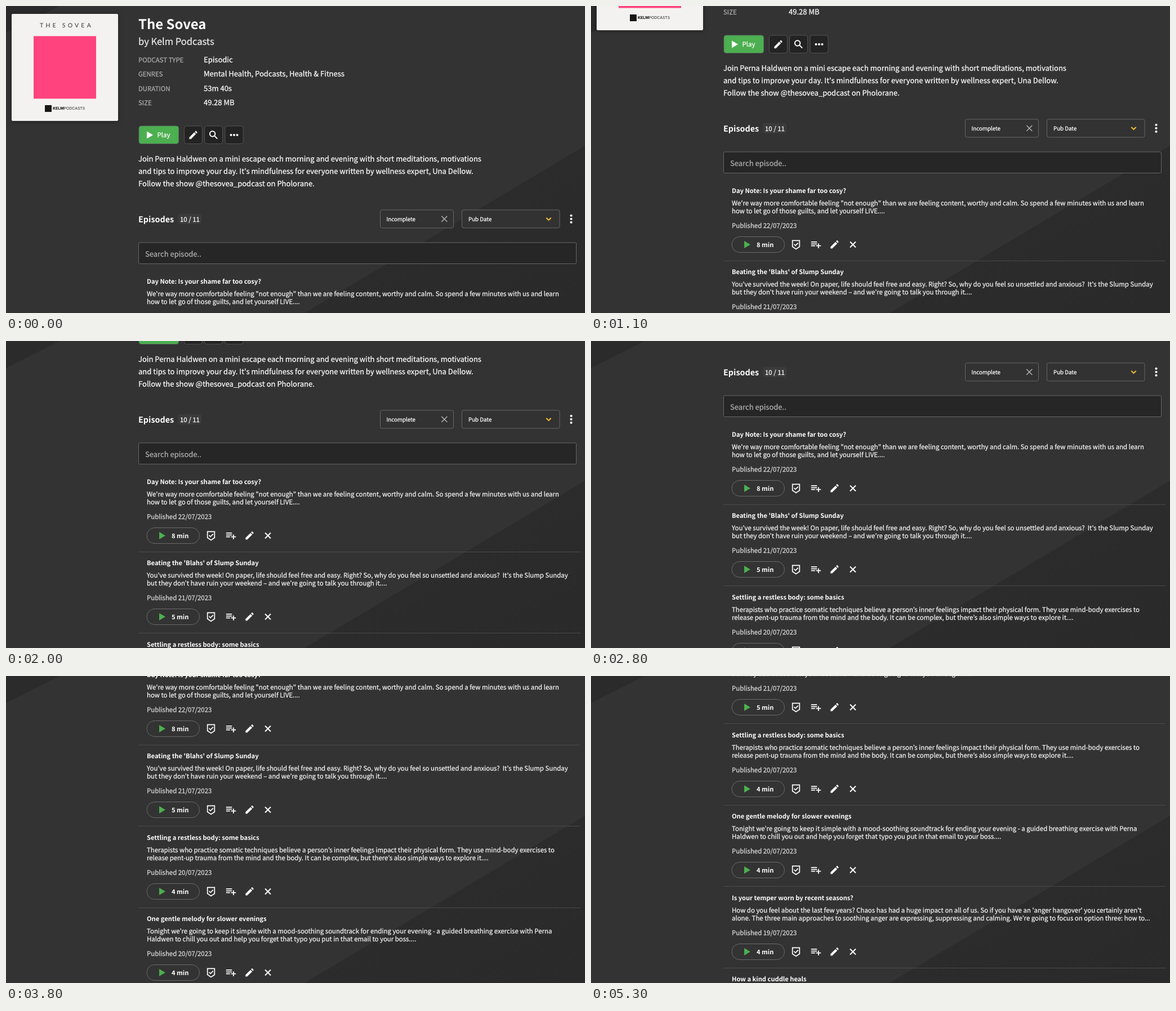
Write an HTML page that moves like this. It is 1028x545 px and loops after 5.4 s.

```html
<!DOCTYPE html>
<html lang="en">
<head>
<meta charset="utf-8">
<title>Podcast page</title>
<style>
  html, body { margin: 0; width: 100%; height: 100%; overflow: hidden; background: #333; }
  svg { display: block; width: 100vw; height: 100vh; }
  text {
    font-family: "Noto Sans CJK KR", "Noto Sans CJK JP", "Noto Sans CJK SC", "Open Sans", sans-serif;
    font-size: 11.41px;
    font-variant-east-asian: proportional-width;
    text-rendering: geometricPrecision;
    color: #fff;
    fill: currentColor;
    stroke: currentColor;
    stroke-width: .25;
  }
  .h1 { font-size: 23.9px; font-weight: 700; stroke: none; }
  .by { font-size: 16.5px; color: #ececec; }
  .h2 { font-size: 14.35px; font-weight: 700; stroke: none; }
  .md { font-size: 13.03px; }
  .sm { font-size: 9.75px; }
  .strong { font-size: 11.15px; font-weight: 700; stroke: none; }
  .label { color: #adadad; }
  .hint { color: #adadad; }
  .body { color: #f4f4f4; }
  .date { color: #dadada; }
  .cover { font-family: Lato, sans-serif; font-size: 10.5px; letter-spacing: 4.2px; color: #333; stroke: none; }
  .badge { font-family: Inter, sans-serif; font-size: 6.9px; color: #222; stroke: none; }
  .art { fill: #f4f2f0; filter: drop-shadow(0 1px 4px #1118); }
  .field { fill: #262626; stroke: #666; }
  .select { fill: #323232; stroke: #666; }
  .btn { fill: #232323; stroke: #525252; }
  .pill { fill: none; stroke: #6a6a6a; }
  .rule { stroke: #4a4a4a; }
  .line { fill: none; stroke: #fff; stroke-width: 2; }
  .icon { fill: #fff; }
  .go { fill: #4caf50; }
</style>
</head>
<body>
<svg viewBox="0 0 1028 545" preserveAspectRatio="none">
  <defs>
    <linearGradient id="shade" x1="0.4" y1="0.3" x2="1" y2="1">
      <stop offset="0" stop-color="#2c2c2c"/>
      <stop offset="1" stop-color="#2a2a2a"/>
    </linearGradient>
    <path id="pencil" transform="scale(.8) translate(-12 -12)" d="M3 17.25V21h3.75L17.8 9.94l-3.75-3.75zM20.7 7c.4-.4.4-1 0-1.4l-2.3-2.3c-.4-.4-1-.4-1.4 0l-1.8 1.8 3.75 3.75z"/>
    <path id="queue" transform="scale(.87) translate(-12 -13)" d="M14 10H2v2h12zM14 6H2v2h12zM18 14v-4h-2v4h-4v2h4v4h2v-4h4v-2zM2 16h8v-2H2z"/>
    <path id="shield" d="M-6.3-7.2H6.3V3.7L0 8-6.3 3.7ZM-3.4-.6-.9 1.9 3.8-2.8"/>
    <path id="cross" d="M-5-5 5 5M5-5-5 5"/>
    <path id="play" d="M-5.5-6.5 5.5 0-5.5 6.5Z"/>
  </defs>

  <rect width="1028" height="545" fill="#333"/>
  <path d="M0 0H95L0 48Z" fill="#2b2b2b"/>
  <path d="M1028 248V545H530Z" fill="url(#shade)"/>

  <g id="page">
    <rect class="art" x="10" y="14" width="189" height="190" rx="2"/>
    <text class="cover" x="60" y="38">THE SOVEA</text>
    <rect x="49" y="53.5" width="111" height="111" fill="#ff437e"/>
    <rect x="69" y="176" width="12" height="12" fill="#161616"/>
    <text class="badge" x="83" y="184.3"><tspan font-weight="800">KELM</tspan>PODCASTS</text>

    <text class="h1" x="235" y="41">The Sovea</text>
    <text class="by" x="235" y="68.5">by Kelm Podcasts</text>
    <g id="facts"></g>

    <rect x="236" y="213" width="70.5" height="31.5" rx="4" fill="#4caf50" stroke="#56705a"/>
    <use href="#play" class="icon" x="255.5" y="229"/>
    <text x="268.6" y="233.4">Play</text>
    <rect class="btn" x="316.5" y="213" width="32" height="31.5" rx="4"/>
    <rect class="btn" x="352.5" y="213" width="32" height="31.5" rx="4"/>
    <rect class="btn" x="389" y="213" width="32" height="31.5" rx="4"/>
    <use href="#pencil" class="icon" x="332.6" y="229"/>
    <circle class="line" cx="366.6" cy="227" r="4.7"/>
    <path class="line" d="M370 230.4l5.2 5.2"/>
    <g class="icon">
      <circle cx="399.5" cy="229" r="2"/><circle cx="405" cy="229" r="2"/><circle cx="410.5" cy="229" r="2"/>
    </g>
    <g id="about"></g>

    <text class="h2" x="235" y="384">Episodes</text>
    <rect x="305" y="369" width="42" height="18" rx="4" fill="#fff" fill-opacity=".04"/>
    <text x="309" y="382.5">10 / 11</text>
    <rect class="select" x="664.5" y="362" width="130" height="32" rx="3"/>
    <text class="sm" x="675.5" y="382">Incomplete</text>
    <use href="#cross" x="778.3" y="378" fill="none" stroke="#b4b4b4" stroke-width="1.5"/>
    <rect class="select" x="809.5" y="362" width="173.5" height="32" rx="3"/>
    <text class="sm" x="821" y="382">Pub Date</text>
    <path d="M959.3 376l4.2 4 4.2-4" fill="none" stroke="#efbd2e" stroke-width="2"/>
    <g class="icon">
      <circle cx="1003.5" cy="372" r="2.1"/><circle cx="1003.5" cy="378" r="2.1"/><circle cx="1003.5" cy="384" r="2.1"/>
    </g>
    <rect class="field" x="235.5" y="420" width="777" height="37.5" rx="2"/>
    <text class="md hint" x="247" y="444.5">Search episode..</text>
    <g id="list"></g>
  </g>
</svg>

<script>
const SVG = "http://www.w3.org/2000/svg";
const byId = id => document.getElementById(id);

function add(parent, tag, attrs, content) {
  const el = document.createElementNS(SVG, tag);
  for (const key in attrs) el.setAttribute(key, attrs[key]);
  if (content) el.textContent = content;
  parent.appendChild(el);
  return el;
}
const write = (parent, cls, x, y, content) => add(parent, "text", { class: cls, x, y }, content);
const icon = (parent, name, cls, x, y) => add(parent, "use", { href: "#" + name, class: cls, x, y });

const facts = [
  ["PODCAST TYPE", "Episodic"],
  ["GENRES", "Mental Health, Podcasts, Health & Fitness"],
  ["DURATION", "53m 40s"],
  ["SIZE", "49.28 MB"]
];
facts.forEach(([label, value], i) => {
  const y = 100 + 25.4 * i;
  write(byId("facts"), "label", 235, y, label);
  write(byId("facts"), "md", 351, y, value);
});

const about = [
  "Join Perna Haldwen on a mini escape each morning and evening with short meditations, motivations",
  "and tips to improve your day. It's mindfulness for everyone written by wellness expert, Una Dellow.",
  "Follow the show @thesovea_podcast on Pholorane."
];
about.forEach((line, i) => write(byId("about"), "md", 235, 276 + 21.8 * i, line));

const episodes = [
  { title: "Day Note: Is your shame far too cosy?", day: 22, min: 8, lines: [
    "We're way more comfortable feeling \"not enough\" than we are feeling content, worthy and calm. So spend a few minutes with us and learn",
    "how to let go of those guilts, and let yourself LIVE...."] },
  { title: "Beating the 'Blahs' of Slump Sunday", day: 21, min: 5, lines: [
    "You’ve survived the week! On paper, life should feel free and easy. Right? So, why do you feel so unsettled and anxious?\u00a0 It's the Slump Sunday",
    "but they don’t have ruin your weekend – and we’re going to talk you through it...."] },
  { title: "Settling a restless body: some basics", day: 20, min: 4, lines: [
    "Therapists who practice somatic techniques believe a person’s inner feelings impact their physical form. They use mind-body exercises to",
    "release pent-up trauma from the mind and the body. It can be complex, but there’s also simple ways to explore it...."] },
  { title: "One gentle melody for slower evenings", day: 20, min: 4, lines: [
    "Tonight we’re going to keep it simple with a mood-soothing soundtrack for ending your evening - a guided breathing exercise with Perna",
    "Haldwen to chill you out and help you forget that typo you put in that email to your boss...."] },
  { title: "Is your temper worn by recent seasons?", day: 19, min: 4, lines: [
    "How do you feel about the last few years? Chaos has had a huge impact on all of us. So if you have an 'anger hangover' you certainly aren't",
    "alone. The three main approaches to soothing anger are expressing, suppressing and calming. We’re going to focus on option three: how to..."] },
  { title: "How a kind cuddle heals", lines: [] }
];

// Each row is laid out from the baseline of its title.
episodes.forEach((ep, i) => {
  const row = add(byId("list"), "g", { transform: `translate(0 ${493 + Math.round(144.4 * i)})` });
  write(row, "strong", 250, 0, ep.title);
  if (!ep.lines.length) return;
  ep.lines.forEach((line, n) => write(row, "body", 250, 21.8 + 14.6 * n, line));
  write(row, "date", 250, 62, `Published ${ep.day}/07/2023`);
  add(row, "rect", { class: "pill", x: 250, y: 77.5, width: 93.5, height: 28, rx: 14 });
  icon(row, "play", "go", 277.5, 91.5);
  write(row, "strong", 294, 95.6, ep.min + " min");
  icon(row, "shield", "line", 364, 91.5).style.strokeWidth = 1.7;
  icon(row, "queue", "icon", 399.5, 92);
  icon(row, "pencil", "icon", 432.5, 91.3);
  icon(row, "cross", "line", 465, 91.5);
  add(row, "path", { class: "rule", d: "M235 120.5H1020" });
});

// Scroll gestures: time in s, offset in px, speed in px/s.
const LOOP = 5400, TICK = 100;
const keys = [
  [0, 0, 0], [0.4, 0, 100], [1.1, 161, 170], [2, 239, 0], [2.5, 239, 150],
  [2.8, 322.5, 300], [3.4, 414, 200], [4.3, 540, 0], [4.5, 540, 120], [5.3, 673, 60]
];

function offsetAt(t) {
  const i = keys.findIndex(k => k[0] > t);
  if (i < 0) return keys[keys.length - 1][1];
  const [t0, y0, v0] = keys[i - 1], [t1, y1, v1] = keys[i];
  if (y0 === y1) return y0;
  const d = t1 - t0, u = (t - t0) / d, w = 1 - u;
  return y0 * (1 + 2 * u) * w * w + y1 * u * u * (3 - 2 * u) + d * u * w * (v0 * w - v1 * u);
}

const page = byId("page");
const start = performance.now();

function draw() {
  const ms = (performance.now() - start) % LOOP;
  const t = Math.floor(ms / TICK) * TICK / 1000;
  page.setAttribute("transform", `translate(0 ${-Math.round(offsetAt(t))})`);
  requestAnimationFrame(draw);
}
draw();
</script>
</body>
</html>
```
